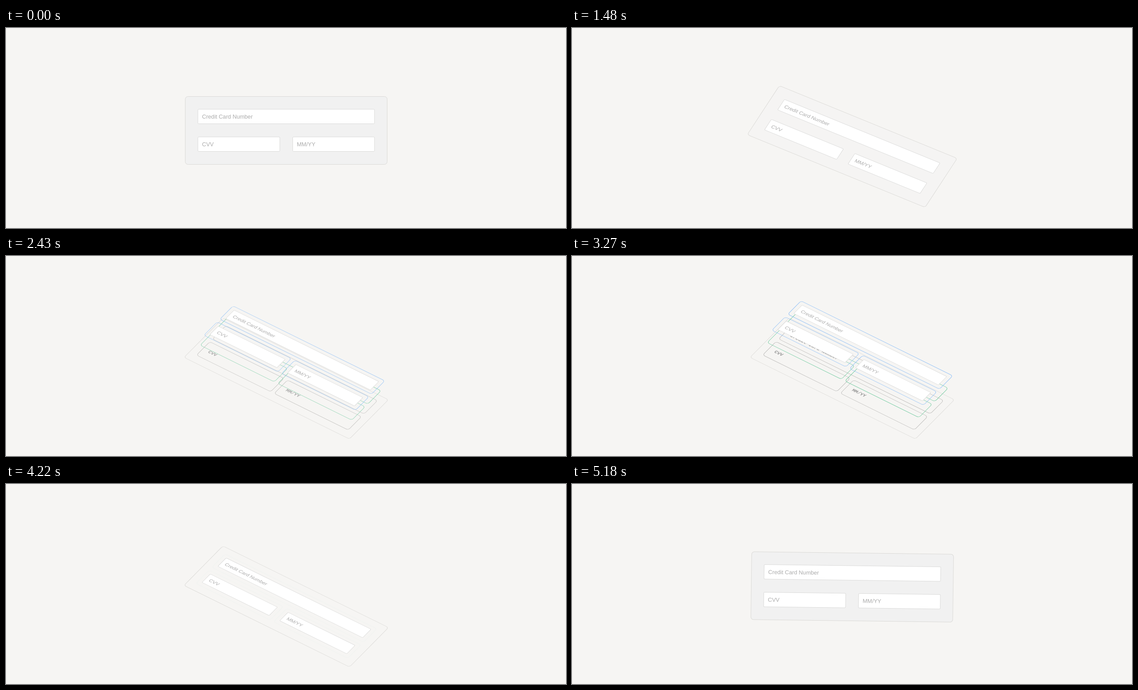
These frames come from a looping animation (1251x448 px, 5300 ms). An HTML page with a canvas:

```html
<!DOCTYPE html>
<html lang="en">
<head>
<meta charset="utf-8">
<title>Card form layers</title>
<style>
  html, body { margin: 0; width: 100%; height: 100%; overflow: hidden; background: #f6f5f3; }
  canvas { display: block; }
</style>
</head>
<body>
<canvas id="stage" width="1251" height="448"></canvas>
<script>
const ctx = document.getElementById('stage').getContext('2d');
const LOOP = 5300, REST = 1000, STEP = 120, PEAK = 17, LIFT_STEP = 8;
const CENTER = { x: 626, y: 229.5 }, DROP = 45;
const SANS = '12.65px "Liberation Sans", Arial, sans-serif';
const MONO = 'bold 12px "Liberation Mono", "Courier New", monospace';

// Progress of each move, one value per step
const EASE = [0.022, 0.125, 0.315, 0.58, 0.8, 0.9, 0.953, 0.985, 0.997, 1];

const fields = [
  { label: 'Credit Card Number', x: 428.7, y: 182, w: 394.5 },
  { label: 'CVV', x: 428.7, y: 244, w: 183 },
  { label: 'MM/YY', x: 640.5, y: 244, w: 182.7 }
];
const FIELD_H = 32.5, PAD = 9.6;

// Screen offset of each layer when fully lifted
const layers = {
  base: { dx: 2, dy: -1.7, color: '#b9b8b6' },
  middle: { dx: 12.1, dy: -29.4, color: '#6cc99d' },
  top: { dx: 22.5, dy: -57.2, color: '#8abdf7' }
};

// Tilted pose: rotateX(45deg) rotateZ(35deg) as one turn about an axis
const tilt = (() => {
  const a = Math.PI / 8, b = 35 * Math.PI / 360;
  const w = Math.cos(a) * Math.cos(b), n = Math.sqrt(1 - w * w);
  return {
    angle: 2 * Math.acos(w),
    x: Math.sin(a) * Math.cos(b) / n,
    y: -Math.sin(a) * Math.sin(b) / n,
    z: Math.cos(a) * Math.sin(b) / n
  };
})();

function ease(step) {
  return step < 0 ? 0 : EASE[Math.min(step, EASE.length - 1)];
}

// The motion advances in held steps, then runs back the same way
function stepAt(t) {
  if (t < REST) return -1;
  const start = k => REST + STEP * k - (k >= 12 ? 10 : 0) - (k >= 27 ? 10 : 0);
  let k = 0;
  while (k < 35 && start(k + 1) <= t) k++;
  return k <= PEAK ? k : 2 * PEAK + 1 - k;
}

function setPlane(p, dx = 0, dy = 0) {
  const { angle, x, y, z } = tilt;
  const s = Math.sin(angle * p), c = Math.cos(angle * p), k = 1 - c;
  ctx.setTransform(
    c + x * x * k, z * s + x * y * k,
    x * y * k - z * s, c + y * y * k,
    CENTER.x + dx, CENTER.y + DROP * p + dy
  );
  ctx.translate(-CENTER.x, -CENTER.y);
}

function box(x, y, w, h, r, stroke, fill) {
  ctx.beginPath();
  ctx.roundRect(x, y, w, h, r);
  if (fill) {
    ctx.fillStyle = fill;
    ctx.fill();
  }
  ctx.strokeStyle = stroke;
  ctx.stroke();
}

function write(label, x, y, font, color) {
  ctx.font = font;
  ctx.fillStyle = color;
  ctx.fillText(label, x, y);
}

function outline(f, color) {
  box(f.x - PAD, f.y - PAD, f.w + 2 * PAD, FIELD_H + 2 * PAD, 6, color);
}

function drawCard(p) {
  setPlane(p);
  box(400.5, 153.5, 451, 152, 6, '#dad9d6', `rgba(241,241,241,${1 - p})`);
}

function drawLayer(name, p, lift) {
  const { dx, dy, color } = layers[name];
  setPlane(p, dx * lift, dy * lift);
  for (const f of fields) {
    if (lift) {
      ctx.globalAlpha = lift;
      outline(f, color);
      if (name === 'base') write(f.label, f.x + 6, f.y + 21, MONO, '#949494');
      ctx.globalAlpha = 1;
    }
    if (name === 'top') {
      box(f.x, f.y, f.w, FIELD_H, 2, '#dadad9', '#fff');
      write(f.label, f.x + 9.3, f.y + 21, SANS, '#acacac');
    }
  }
}

function draw(t) {
  const step = stepAt(t);
  const p = ease(step), lift = ease(step - LIFT_STEP);
  ctx.resetTransform();
  ctx.fillStyle = '#f6f5f3';
  ctx.fillRect(0, 0, 1251, 448);
  ctx.lineWidth = 1;
  drawCard(p);
  for (const name of Object.keys(layers)) drawLayer(name, p, lift);
}

const begin = performance.now();
function tick() {
  draw((performance.now() - begin) % LOOP);
  requestAnimationFrame(tick);
}
tick();
</script>
</body>
</html>
```
